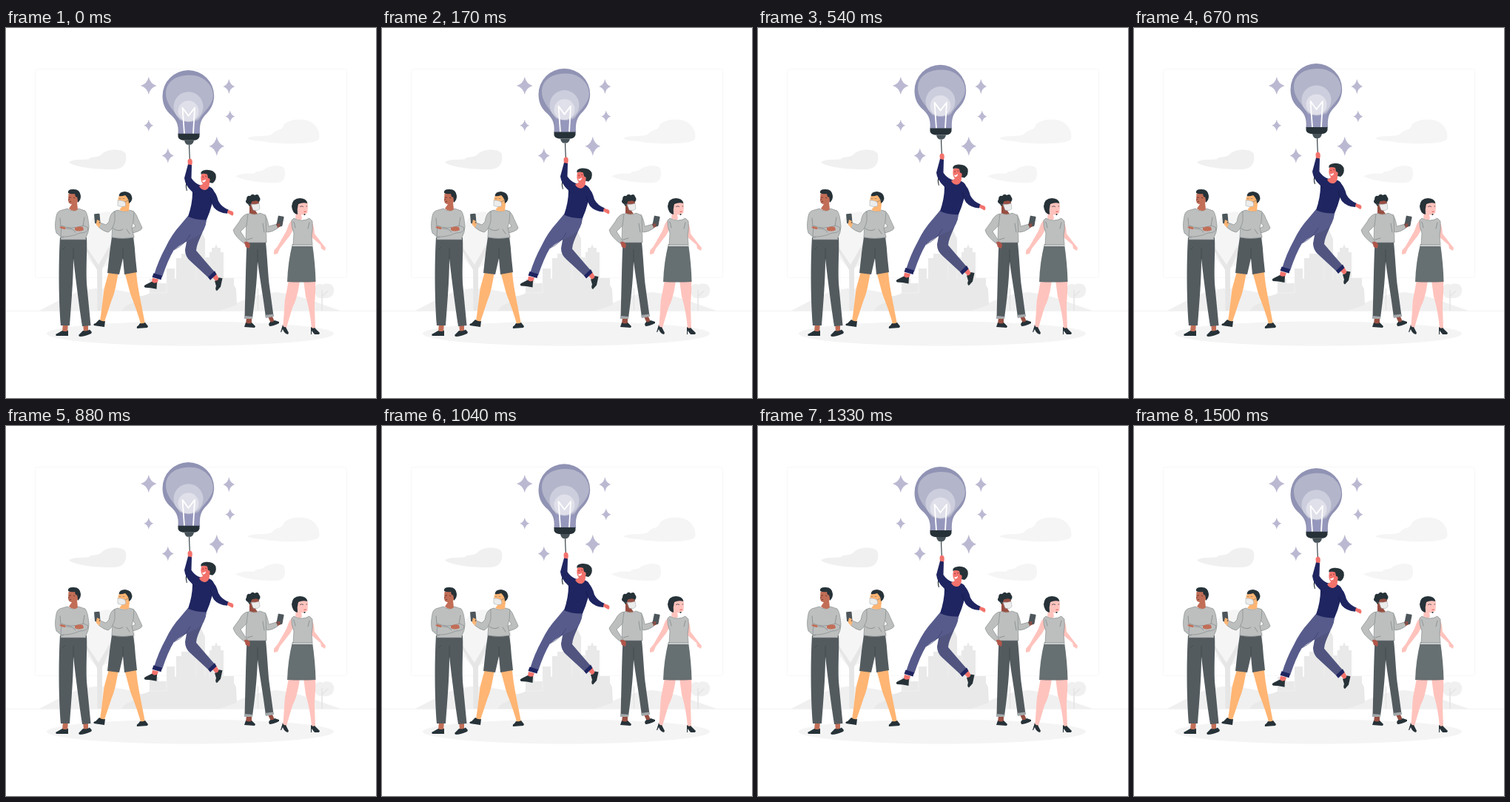
Animation of 500x500 px, one loop 1.54 s. Source, as an HTML page:

```html
<!DOCTYPE html>
<html lang="en">
<head>
<meta charset="utf-8">
<title>Floating idea</title>
<style>
html, body { margin: 0; width: 100%; height: 100%; overflow: hidden; background: #fff; }
svg { display: block; width: 100vw; height: 100vh; }
.dark { fill: #263238; }
.slate { fill: #535b5f; }
.grey { fill: #bcbfbe; stroke: #7c8284; stroke-width: .6; stroke-linejoin: round; }
.crease { fill: none; stroke: #6f7577; stroke-width: .6; stroke-linecap: round; }
.fold { fill: none; stroke: #3c4448; stroke-width: .6; }
.mask { fill: #ececec; stroke: #9aa0a3; stroke-width: .5; }
.navy { fill: #1f2560; }
.pale { fill: #f5f5f5; }
.haze { fill: #f0f0f0; }
.mist { fill: #e9e9e9; }
.brown { fill: #c26e57; }
.amber { fill: #ffb573; }
.umber { fill: #984f43; }
.rose { fill: #ffc3bd; }
.coral { fill: #f3726c; }
</style>
</head>
<body>
<svg viewBox="0 0 500 500">
<defs><path id="star" d="M0-1Q.2-.2 1 0Q.2.2 0 1Q-.2.2-1 0Q-.2-.2 0-1Z"/></defs>

<!-- backdrop -->
<rect x="39.5" y="55.5" width="421" height="282" rx="3" fill="none" stroke="#f8f8f8"/>
<path class="haze" d="M85 181C95 176 105 179 112 177C117 172 124 177 130 170C136 163 160 162 162 171C164 187 155 192 140 191C115 191 90 187 85 181Z"/>
<g class="pale">
  <path d="M326 149C340 143 355 149 361 142C366 136 372 140 375 132C380 123 401 121 412 127C422 132 425 145 423 150C418 158 370 157 352 154C340 152 330 152 326 149Z"/>
  <path d="M310 200C320 196 328 196 335 197C338 192 344 195 349 191C354 186 374 184 376 190C379 200 376 209 366 209C345 210 320 206 310 200Z"/>
</g>
<path class="haze" d="M45 382L72 368Q95 355 120 352Q158 352 190 365L215 382ZM290 382L318 369Q345 358 366 357Q390 360 412 368L452 382Z"/>
<path class="pale" d="M126 325C106 318 103 288 110 270C116 252 131 246 143 249C165 253 177 270 174 289C170 310 146 318 126 325Z"/>
<path d="M157 382C162 371 171 375 176 367C182 360 191 362 194 358V339H206V345H217V325H228V339H230V311H237V305H247V295H257V283L263 272L269 285V310H275V303H278V297H282L284 292L286 297H290V303H294V338H308V347L311 353L312 374L289 382Z" class="mist"/>
<path d="M257 340V300M269 340V307M275 340V303M194 358H217V339" fill="none" stroke="#f1f1f1" stroke-width=".8"/>
<path d="M123.500 382L123 327L106 296L108 295L125 320L143 289L146 291L130 326L130 382Z" fill="#e6e6e6"/>
<path d="M418 354C417 347 423 344 428 347C434 343 445 346 443 356C442 365 433 366 427 365C421 366 417 361 418 354Z" class="haze"/>
<path d="M427 382V354M427 363L435 355M340.500 382V352" fill="none" stroke="#e4e4e4" stroke-width="1.500"/>
<path d="M0 382.500H500" stroke="#f0f0f0" stroke-width=".8"/>
<ellipse cx="249" cy="413" rx="194" ry="16.500" fill="#f4f4f4"/>
<g id="stars" fill="#bbb9d2"></g>

<!-- man with crossed arms -->
<g>
  <path class="brown" d="M77 399H84L83 411H76ZM104 399H111L111 410H105Z"/>
  <path class="dark" d="M76 409C79 411 82 410 84 408.500L84 416H68Q66 414 69 413ZM104 409C108 410 111 409 113 407.500L116 411L115 413Q106 417 100 417Q97 416 99 414Z"/>
  <path class="slate" d="M73 283H109C110 300 108 320 109 345L114.500 402L103 403C99 378 95 345 91 312C91 340 88 375 86 402H74C71 365 71 315 73 283Z"/>
  <path class="fold" d="M91 312V297M80 296L76 300"/>
  <path class="grey" d="M83 244Q91 250 98 244L107 247Q111 252 112 268Q112 276 108 283V286H74V282L68 277Q65 268 68 254Q69 247 76 246Z"/>
  <path class="crease" d="M73 257Q73 268 77 278Q80 284 75 283M106 256L104 268"/>
  <path class="grey" d="M75 267Q87 273 105 267L111 270Q111 277 100 277Q87 283 74 282Z"/>
  <path class="crease" d="M82 271Q90 270 94 276"/>
  <path class="brown" d="M72 269Q76 267 81 270L80 272Q75 272 72 269ZM93 270Q98 267 104 269L105 273Q98 276 93 273Z"/>
  <path class="brown" d="M84.500 224Q93 219 99 226Q99 233 96 236L97 245Q92 250 85 244L89 238Q84 238 84 232Z"/>
  <path class="dark" d="M84 223Q83 218 90 218Q100 217 101 227Q101 233 97 236Q97 231 96 228Q94 230 93 224Q88 225 84 223Z"/>
  <path d="M85 229H88M91 229L93 230M85.500 235L88 234.500M86 231L84 233" fill="none" stroke="#4a2a25" stroke-width=".7"/>
</g>

<!-- woman with mask and phone -->
<g>
  <path class="amber" d="M139 329H152C149 347 147 358 143 367L133 397L127 396C130 378 131 362 133 351ZM160 329H176C177 343 179 353 181 364L188 400H182C178 384 172 370 168 359Z"/>
  <path class="dark" d="M126 394Q130 397 134 396L133 404L119 402Q117 400 121 399ZM181 399Q185 400 188 398L192 403L191 405L177 406Q176 403 179 402Z"/>
  <path class="slate" d="M143 282H172Q174 295 175 311L177 330L160 333L158 311L153 333L137 331L140 304Z"/>
  <path class="fold" d="M158 312V298"/>
  <path class="grey" d="M169 247Q175 248 178 257L184 270Q183 275 166 278L165 273L175 268L169 259Z"/>
  <path class="amber" d="M162 272Q167 270 168 273L166 279Q162 281 162 276Z"/>
  <path class="grey" d="M151 246Q159 250 167 246L173 248L172 261L170 270L173 283Q157 286 143 283L144 266L143 252Q145 247 151 246Z"/>
  <path class="grey" d="M147 248Q141 249 139 262L135 266L127 263L125 269Q132 275 138 276Q144 273 147 261Z"/>
  <path class="crease" d="M145 271Q152 276 158 272M163 272L167 278"/>
  <path class="amber" d="M122 260L128 263L126 270L122 266ZM152 228Q160 222 167 228L167 237L166 247Q159 249 153 246L157 241Q151 240 151 234Z"/>
  <rect x="119.500" y="251" width="7.500" height="13" rx="1" transform="rotate(-5 123 257)" fill="#4d565a"/>
  <path class="amber" d="M123 259L127 261L125 265L122 264Z"/>
  <path class="dark" d="M152.500 227Q153 221 161 221Q170 222 170.500 230Q170 235 166 237Q166 230 161 226Q156 228 152.500 227Z"/>
  <path class="mask" d="M151 233Q156 232 161 235L162 240Q158 243 151 240Z"/>
  <path class="crease" d="M161 235L167 232M153 230.500H155M158 230.500H160"/>
</g>

<!-- man with mask and phone -->
<g>
  <path class="umber" d="M325 391H332L332 400H324ZM354 390H360L364 399H358Z"/>
  <path class="dark" d="M324 398Q329 401 332 398L337 403L336 405L322 404ZM357 397Q361 398 363 395L369 397L369 399Q361 403 356 403L355 400Z"/>
  <path class="slate" d="M325.500 289H351C353 310 354 330 355.500 345L361.500 389L351 391C348 367 344 344 340 316C339 345 336 370 333 392H322.500C323.500 360 324 320 325.500 289Z"/>
  <path d="M322 389L333.500 390L333 393H322ZM350 388L361.500 386.500L362 390L351 392Z" fill="#a4a8aa"/>
  <path class="fold" d="M340 316V299"/>
  <path class="grey" d="M349 252Q353 255 355 268L366 265L368 270Q360 276 353 276Q347 271 346 262Z"/>
  <path class="umber" d="M365 265Q370 261 374 264L372 268L367 270Z"/>
  <rect x="366.500" y="254" width="8" height="13.500" rx="1" transform="rotate(11 370 261)" fill="#4d565a"/>
  <path class="umber" d="M366 265L371 264L369 268Z"/>
  <path class="grey" d="M329 250Q337 254 343 250L351 253L352 290H324L325 254Z"/>
  <path class="grey" d="M327 251Q320 252 315 262L307 273Q309 282 323 292L326 289L317 275L325 267Z"/>
  <path d="M322 289Q328 288 330 293L329 298L324 296Z" fill="#b0564a"/>
  <path class="crease" d="M347 264L349 276M326 286L333 284"/>
  <path class="umber" d="M329 234Q336 227 342 235L341 244L337 247L340 251Q334 253 329 250Z"/>
  <path class="dark" d="M327 238Q322 235 325 232Q325 226 330 227Q333 223 336 226Q341 223 342 228Q345 231 342 235Q338 232 335 234Q332 233 331 238L329 241Z"/>
  <path class="mask" d="M331 238Q337 239 342 237L343 244Q340 248 334 246Z"/>
  <path class="crease" d="M328 238L332 239"/>
</g>

<!-- woman in skirt -->
<g>
  <path class="rose" d="M382 341H397C395 358 391 371 387 378L379 405L374 405C376 389 376 375 377 367ZM402 341H418C419 356 417 367 417 378L418 407L413 408C412 389 408 373 405 363Z"/>
  <path class="dark" d="M374 401Q375 405 378 404L382 412L381 414Q376 413 374 407L372 411H371ZM412 404Q415 407 417 405L424 412L423 414L417 414L413 409V414H412Z"/>
  <path class="rose" d="M388 258Q383 261 379 274L367 295L362 301L362 306L367 305L370 298L384 280L391 267ZM411 260Q416 263 417 278L427 291L432 297L431 301L426 298L425 293L412 282Z"/>
  <path d="M387 292H414Q418 319 418.500 343Q398 344 380 343Q381 316 387 292Z" fill="#666f71"/>
  <path d="M387.500 292.500H414L414 295H387Z" fill="#d5d7d7"/>
  <path class="grey" d="M389 257Q400 263 410 257L414 261Q415 272 413 281L414 293H388L389 277Q385 268 386 260Z"/>
  <path class="crease" d="M389 262L391 270M410 263L408 271"/>
  <path class="rose" d="M393 237Q402 230 408 238L407.500 249Q404 254 399 252L400 258Q397 261 391 257Z"/>
  <path class="dark" d="M394 252Q387 251 386 241Q387 230 397 230Q406 230 407.500 237Q401 235 395 238Q393 245 394 252Z"/>
  <path d="M397 241.500Q400 240 402 241.500M405.500 241H407" fill="none" stroke="#263238" stroke-width=".7"/>
  <path d="M402 248L406 247.500Q405 250 402 248Z" fill="#e35d5d"/>
  <circle cx="403.500" cy="252" r="1" class="dark"/>
</g>

<!-- floating man with bulb -->
<g id="flyer">
  <path d="M232.500 144C234 129 229 123 221 116C214 109 211.500 101 211.500 92A34.850 34.850 0 0 1 281.200 92C281 101 278 109 271 116C264 123 261 129 262 144Z" fill="#9193b4"/>
  <path d="M235 125C228 112 216 104 216 88C217 71 231 64 249 64C267 64 280 77 280 92C279 105 267 113 260 125Q247 131 235 125Z" fill="#b3b5ca"/>
  <circle cx="246.500" cy="106.500" r="20" fill="#cdcedd"/>
  <circle cx="246.500" cy="112.500" r="14" fill="#e0e0ea"/>
  <path d="M234 124Q247 131 261 124L260.500 143H234Z" fill="#9698bd" opacity=".85"/>
  <path d="M241 143L238.500 108L246.500 119L255 108L253 143" fill="none" stroke="#fff" stroke-width="1.800" stroke-linejoin="round"/>
  <path d="M232.500 143H261.500V147Q260 151.500 255 152H239Q233 151 232.500 147Z" class="dark"/>
  <path d="M241 152H254Q253 157 249.500 158H245Q242 157 241 152Z" fill="#48545a"/>
  <path d="M247.500 158L248.500 183M245 207Q242 213 244.500 220" fill="none" stroke="#263238" stroke-width="1.100"/>

  <path class="coral" d="M198 338L206 340L203 348H196ZM278 336L284 332L289 341L285 344Z"/>
  <path class="dark" d="M204 344L203.500 353Q195 351 188 351Q185 349 189 347L197 343Q200 346 204 344ZM282 342Q287 342 287.500 337.500L292.500 338.500L290 350L285 355.500Q282 354 284 349Z"/>
  <path d="M271 258C269 274 258 288 257 301Q268 314 282 330L275 339L249 315Q242 309 242 300L247 273Z" fill="#50547f"/>
  <path d="M246 254L271 259Q270 275 258 282Q239 290 227 300Q219 313 211 337L200 334Q206 314 216 296Q224 279 236 266Z" fill="#575b8b"/>
  <path d="M227 300Q243 292 249 279" fill="none" stroke="#3c406e" stroke-width=".7"/>
  <path class="navy" d="M199.500 331.500L211 335L209.500 340.500L197.500 337ZM282 328.500L284.500 333L276 341L273 337Z"/>

  <path class="navy" d="M278 218Q284 222 287 234Q291 242 301 246L299 251Q287 250 281 243L274 230Z"/>
  <path class="coral" d="M300 246L306 248Q309 251 306 254L299 250ZM246 186L245.500 180Q246 176 250 177Q253 179 251 186Z"/>
  <path class="navy" d="M246 184.500L251 185.500L250.500 203Q255 210 262 212.500L272 214Q279 215 281 221Q280 239 271 259.500Q257 260 246 255Q252 238 252 222Q242 213 241 203Z"/>
  <path d="M252 222L256 226M276 229L278 237" fill="none" stroke="#141947" stroke-width=".7"/>
  <path class="coral" d="M264 198Q272 193 278 201L275 210Q275 217 270 219Q264 220 261 214L266 211Q262 206 264 198Z"/>
  <path class="dark" d="M263.500 198Q262 193 270 192Q280 191 283.500 198Q285 206 279 210L275 209Q277 203 273 203L272 198Q267 196 263.500 198Z"/>
  <path d="M265 206Q268 207 270 204.500Q270 209 266 208.500Z" fill="#fff"/>
  <path d="M265.500 201.500H267M269.500 200.500H271" fill="none" stroke="#5d2a30" stroke-width=".8"/>
</g>
</svg>
<script>
const LOOP = 1540, FPS = 24, CYCLE = 36, LIFT = 10;
const flyer = document.getElementById('flyer');

// x, y, half width, half height
const stars = [
  [192.8, 78, 10.8, 12], [301.3, 79, 8, 10], [192.8, 131.7, 6.5, 8],
  [302.8, 119.6, 6.5, 8], [218.8, 172.6, 8, 10], [284.8, 159.8, 10.3, 13]
];
document.getElementById('stars').innerHTML = stars.map(([x, y, w, h]) =>
  `<use href="#star" transform="translate(${x} ${y}) scale(${w} ${h})"/>`).join('');

function draw(now) {
  const step = Math.floor((now % LOOP + 5) * FPS / 1000);
  const phase = (step + 0.3) / CYCLE % 1;
  const y = -LIFT * (1 - Math.abs(1 - 2 * phase));
  flyer.setAttribute('transform', `translate(0 ${y.toFixed(2)})`);
  requestAnimationFrame(draw);
}
draw(performance.now());
</script>
</body>
</html>
```
